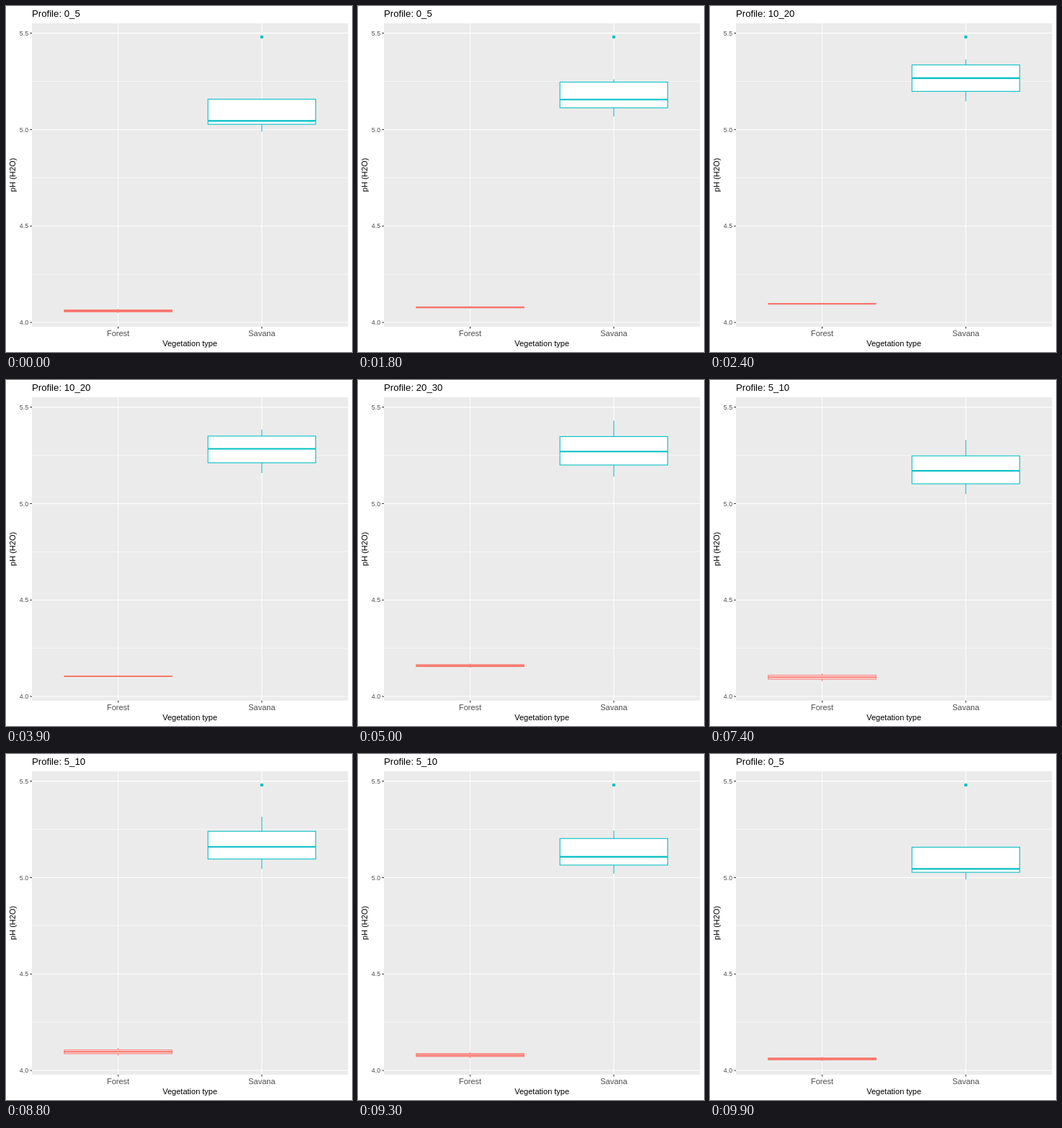
Animation, 480 px wide and 480 px high, one loop 10 s. Source, as an HTML page:

```html
<!DOCTYPE html>
<html lang="en">
<head>
<meta charset="utf-8">
<title>pH by vegetation type</title>
<style>
  html, body { margin: 0; height: 100%; overflow: hidden; background: #fff; }
  svg { display: block; width: 100%; height: 100%; }
  text { font-family: "Liberation Sans", Arial, sans-serif; font-size: 11px; }
  .tick { stroke: #333; stroke-width: 1.07; }
  .major { stroke: #fff; stroke-width: 1.07; }
  .minor { stroke: #fff; stroke-width: .53; }
  .label { fill: #4d4d4d; }
  .small { font-size: 8.8px; }
  .middle { text-anchor: middle; }
  .end { text-anchor: end; }
</style>
</head>
<body>
<svg id="chart" viewBox="0 0 480 480"></svg>
<script>
const chart = document.getElementById('chart');
const LEFT = 36, RIGHT = 474.5, TOP = 23.9, BOTTOM = 444.8;
const xAt = c => LEFT + (c - 0.4) / 2.2 * (RIGHT - LEFT);
const yAt = v => 439.05 - (v - 4) * 267.6;

function set(node, attrs) {
  for (const name in attrs) node.setAttribute(name, attrs[name]);
  return node;
}
function add(tag, attrs, text = '') {
  const node = set(document.createElementNS('http://www.w3.org/2000/svg', tag), attrs);
  node.textContent = text;
  return chart.appendChild(node);
}
const line = (cls, x1, y1, x2, y2) => add('line', { class: cls, x1, y1, x2, y2 });

// Panel, grid and axes
add('rect', { x: LEFT, y: TOP, width: RIGHT - LEFT, height: BOTTOM - TOP, fill: '#ebebeb' });
for (const v of [4.25, 4.75, 5.25]) line('minor', LEFT, yAt(v), RIGHT, yAt(v));
for (const v of [4, 4.5, 5, 5.5]) {
  line('major', LEFT, yAt(v), RIGHT, yAt(v));
  line('tick', LEFT - 2.74, yAt(v), LEFT, yAt(v));
  add('text', { class: 'label small end', x: 31.1, y: yAt(v) + 3.1 }, v.toFixed(1));
}
['Forest', 'Savana'].forEach((name, i) => {
  const x = xAt(i + 1);
  line('major', x, TOP, x, BOTTOM);
  line('tick', x, BOTTOM, x, BOTTOM + 2.74);
  add('text', { class: 'label middle', x, y: 458 }, name);
});
add('text', { class: 'middle', x: 255.2, y: 472 }, 'Vegetation type');
add('text', { class: 'middle', transform: 'translate(13 234.4) rotate(-90)' }, 'pH (H2O)');
const title = add('text', { x: 36, y: 15, style: 'font-size:13.2px' });

// Each box: minimum, lower quartile, median, upper quartile, maximum
const profiles = [
  { name: '0_5', boxes: [[4.05, 4.055, 4.06, 4.065, 4.07], [4.99, 5.0275, 5.045, 5.1575, 5.1575]] },
  { name: '10_20', boxes: [[4.1, 4.1, 4.1, 4.1, 4.1], [5.16, 5.2125, 5.285, 5.35, 5.38]] },
  { name: '20_30', boxes: [[4.15, 4.155, 4.16, 4.165, 4.17], [5.14, 5.2, 5.27, 5.3475, 5.43]] },
  { name: '5_10', boxes: [[4.08, 4.09, 4.1, 4.11, 4.12], [5.05, 5.1025, 5.17, 5.2475, 5.33]] }
];

const outlier = add('circle', { cx: xAt(2), cy: yAt(5.48), r: 2.3, fill: '#00bfc4' });

const plots = ['#f8766d', '#00bfc4'].map((stroke, i) => {
  const x = xAt(i + 1), half = (RIGHT - LEFT) / 2.2 * 0.375;
  const pen = { stroke, 'stroke-width': 1.07 };
  const whisker = add('line', { x1: x, x2: x, ...pen });
  const box = add('rect', { x: x - half, width: 2 * half, fill: '#fff', ...pen });
  const median = add('line', { x1: x - half, x2: x + half, stroke, 'stroke-width': 2.13 });
  return values => {
    const [min, low, mid, high, max] = values.map(yAt);
    set(whisker, { y1: min, y2: max });
    set(box, { y: high, height: low - high });
    set(median, { y1: mid, y2: mid });
  };
});

// Ten steps per second; each move starts at a step and lasts a number of steps
const moves = [[13, 13], [39, 12], [63, 12], [88, 12]];

function draw(ms) {
  const step = Math.floor(ms % 10000 / 100);
  const index = Math.max(0, moves.findLastIndex(([start]) => step >= start));
  const [start, count] = moves[index];
  const p = Math.min(1, Math.max(0, (step - start + 1) / count));
  const from = profiles[index], to = profiles[(index + 1) % 4];

  title.textContent = 'Profile: ' + (p > 0.5 ? to : from).name;
  plots.forEach((update, i) =>
    update(from.boxes[i].map((v, k) => v + (to.boxes[i][k] - v) * p)));
  const visible = (index === 0 && p < 1) || (index === 3 && p > 0);
  set(outlier, { visibility: visible ? 'visible' : 'hidden' });
}

const began = performance.now();
function tick() {
  draw(performance.now() - began);
  requestAnimationFrame(tick);
}
tick();
</script>
</body>
</html>
```
